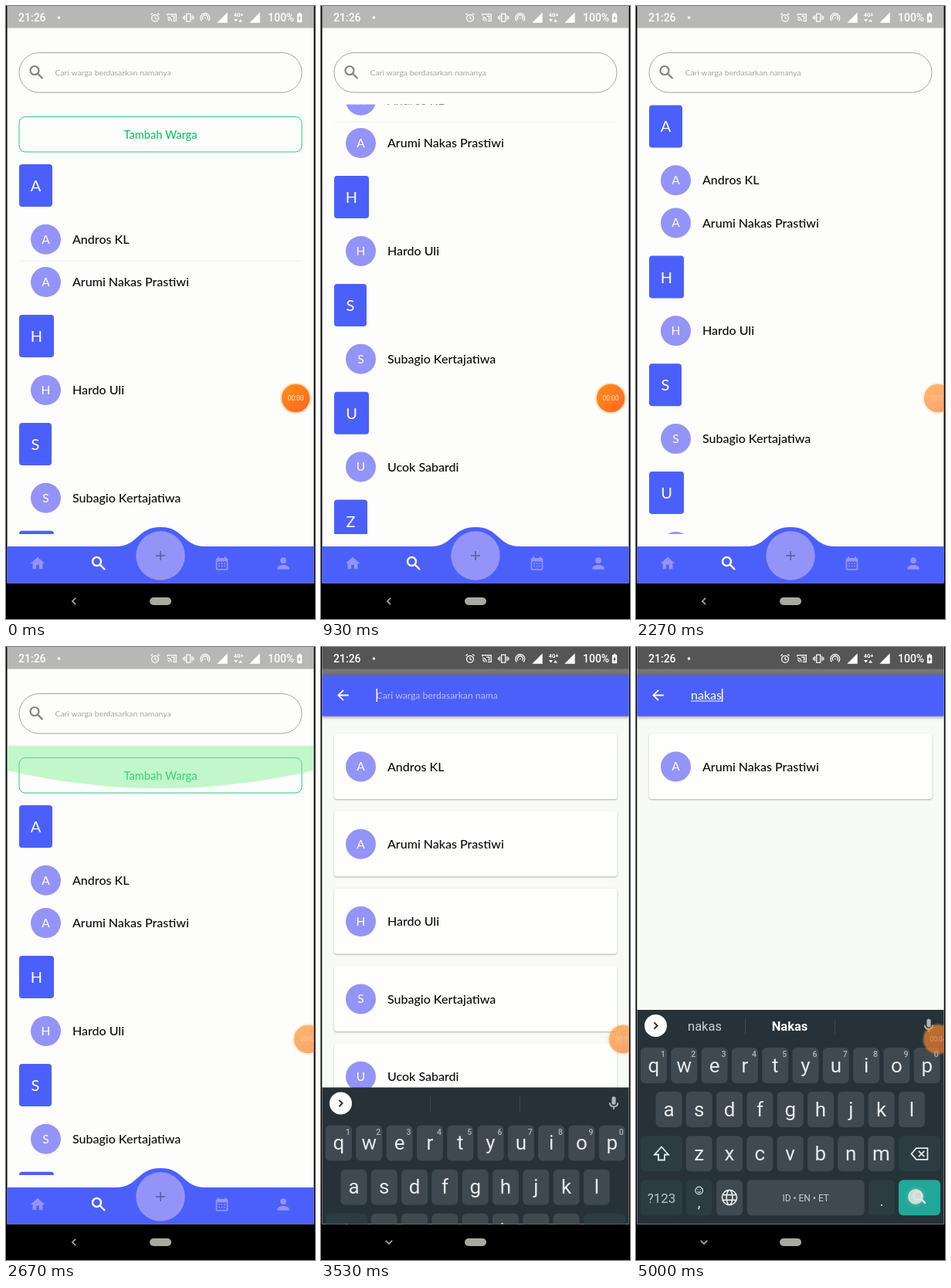
Recreate the animation shown at these times as an HTML page with a canvas. Size 400 px wide and 794 px high, loop 5070 ms.

```html
<!DOCTYPE html>
<html lang="id">
<head>
<meta charset="utf-8">
<style>
  html, body { margin: 0; width: 100%; height: 100%; overflow: hidden; background: #000; }
  canvas { display: block; }
</style>
</head>
<body>
<canvas id="stage" width="400" height="794"></canvas>
<script>
const c = document.getElementById('stage').getContext('2d');
const LOOP = 5070, STEP = LOOP / 76;
const BLUE = '#4b60fb', LILAC = '#9494f8', PAPER = '#fdfdfb', WHITE = '#fff';
const KEYBOARD = '#263238', KEY = '#3e4a50', SIDE_KEY = '#2c3c42', KEYTEXT = '#e6eaea', NAV = '#a9a9a2';
const ROUND = 'Lato, sans-serif', PLAIN = 'Roboto, sans-serif';
const NAMES = ['Andros KL', 'Arumi Nakas Prastiwi', 'Hardo Uli', 'Subagio Kertajatiwa', 'Ucok Sabardi', 'Zulham Wisnanto', 'q'];
const ROWS = ['qwertyuiop', 'asdfghjkl', 'zxcvbnm'];
const ROW_X = [23, 42.5, 81.7], PITCH = 39.3;

// Key presses: start time, key, touch position
const TAPS = [
  [4000, 'n', 278, 657], [4120, 'a', 43, 618], [4190, 'k', 323, 601],
  [4330, 'a', 43, 606], [4460, 's', 82, 602], [4920, '', 362, 712]
];
const COMMIT = 70, HOLD = 110;

const ICONS = {
  home: 'M10 20v-6h4v6h5v-8h3L12 3 2 12h3v8z',
  person: 'M12 12a4 4 0 1 0 0-8 4 4 0 0 0 0 8zm0 2c-2.67 0-8 1.34-8 4v2h16v-2c0-2.66-5.33-4-8-4z',
  calendar: 'M19 4h-1V2h-2v2H8V2H6v2H5a2 2 0 0 0-2 2v14a2 2 0 0 0 2 2h14a2 2 0 0 0 2-2V6a2 2 0 0 0-2-2zm0 16H5V9h14z' +
    'M7 11h2v2H7zM11 11h2v2h-2zM15 11h2v2h-2zM7 15h2v2H7zM11 15h2v2h-2zM15 15h2v2h-2z',
  back: 'M20 11H7.8l5.6-5.6L12 4l-8 8 8 8 1.4-1.4L7.8 13H20z',
  mic: 'M12 14a3 3 0 0 0 3-3V5a3 3 0 0 0-6 0v6a3 3 0 0 0 3 3zM17 11a5 5 0 0 1-10 0H5a7 7 0 0 0 6 6.9V21h2v-3.1A7 7 0 0 0 19 11z',
  battery: 'M15.7 4H14V2h-4v2H8.3C7.6 4 7 4.6 7 5.3v15.4c0 .7.6 1.3 1.3 1.3h7.4c.7 0 1.3-.6 1.3-1.3V5.3c0-.7-.6-1.3-1.3-1.3zM11 19v-5H9l4-7v5h2z',
  signal: 'M2 22h20V2z',
  // outlined
  search: 'M15 9.5a5.5 5.5 0 1 1-11 0a5.5 5.5 0 1 1 11 0zM13.6 13.6L20 20',
  left: 'M14.5 7l-5 5 5 5', right: 'M9.5 7l5 5-5 5', down: 'M7 9.5l5 5 5-5',
  shift: 'M12 3L3 13h5v7h8v-7h5z',
  erase: 'M8 5h14v14H8l-6-7zM11 8.5l7 7M18 8.5l-7 7',
  globe: 'M22 12a10 10 0 1 1-20 0a10 10 0 1 1 20 0zM16 12a4 10 0 1 1-8 0a4 10 0 1 1 8 0zM3.5 8.5h17M3.5 15.5h17',
  smile: 'M21 12a9 9 0 1 1-18 0a9 9 0 1 1 18 0zM8 14q4 5 8 0M8.5 8.5v2M15.5 8.5v2',
  alarm: 'M19 13a7 7 0 1 1-14 0a7 7 0 1 1 14 0zM12 9v4l3 2M3 6l4-3M21 6l-4-3',
  cast: 'M3 8V5h18v14h-7M3 11q8 0 8 8M3 15q4 0 4 4M11 9h6v6h-2',
  vibrate: 'M8 4h8v16H8zM4.5 7v10M19.5 7v10M1.5 9v6M22.5 9v6',
  hotspot: 'M5 19a9.5 9.5 0 1 1 14 0M8 16a5.5 5.5 0 1 1 8 0M12 11v3'
};

const clamp = v => Math.max(0, Math.min(1, v));
const part = (t, a, b) => clamp((t - a) / (b - a));
const ease = (t, a, b) => 1 - (1 - part(t, a, b)) ** 2;
const swell = (t, a, b) => Math.sin(Math.PI * part(t, a, b));

function rect(x, y, w, h, fill, r = 0, stroke) {
  c.beginPath();
  c.roundRect(x, y, w, h, r);
  if (fill) { c.fillStyle = fill; c.fill(); }
  if (stroke) { c.strokeStyle = stroke; c.lineWidth = 1; c.stroke(); }
}

function disc(x, y, r, fill) {
  c.beginPath();
  c.arc(x, y, r, 0, 7);
  c.fillStyle = fill;
  c.fill();
}

function text(s, x, y, size, fill, align = 'left', family = ROUND, weight = 400) {
  c.font = `${weight} ${size}px ${family}`;
  c.textAlign = align;
  c.textBaseline = 'alphabetic';
  c.fillStyle = fill;
  c.fillText(s, x, y + size * 0.35);
}

function icon(name, x, y, size, color, line) {
  const path = new Path2D(ICONS[name]);
  c.save();
  c.translate(x - size / 2, y - size / 2);
  c.scale(size / 24, size / 24);
  c.fillStyle = c.strokeStyle = color;
  c.lineWidth = line;
  if (line) c.stroke(path); else c.fill(path, 'evenodd');
  c.restore();
}

function clipped(x, y, w, h, draw) {
  c.save();
  c.beginPath();
  c.rect(x, y, w, h);
  c.clip();
  draw();
  c.restore();
}

function person(name, y) {
  disc(51.5, y, 19.5, LILAC);
  text(name[0], 51.5, y, 15.5, WHITE, 'center');
  text(name, 86, y, 16, '#0c0c0c', 'left', ROUND, 500);
}

function glow(edge, dir, amount, depth) {
  if (!amount) return;
  const d = depth * amount * dir;
  c.beginPath();
  c.moveTo(1, edge);
  c.lineTo(1, edge + d * 0.58);
  c.quadraticCurveTo(200, edge + d * 1.42, 399, edge + d * 0.58);
  c.lineTo(399, edge);
  c.fillStyle = `rgba(120,240,140,${0.46 * Math.sqrt(amount)})`;
  c.fill();
}

function drawList(t) {
  const scroll = 180 * ease(t, 270, 920) + 251 * ease(t, 1000, 1470) - 431 * ease(t, 1950, 2500);
  clipped(1, 127.5, 398, 556.5, () => {
    c.save();
    c.translate(0, -scroll);
    rect(17, 143.5, 366, 45.5, null, 8, '#25c97c');
    text('Tambah Warga', 200, 166.5, 14.5, '#12c06c', 'center', ROUND, 500);
    let y = 205, last = '';
    for (const name of NAMES) {
      if (name[0] !== last) {
        const w = { H: 45, U: 45, S: 42 }[name[0]] || 43;
        rect(17, y, w, 55, BLUE, 4);
        text(name[0], 17 + w / 2, y + 28, 20, WHITE, 'center');
        y += 97.3;
      } else {
        y += 55.3;
        if (t < 1900) rect(17, y - 27.5, 366, 1, '#f3f3e4');
      }
      person(name, y);
      last = name[0];
      const next = NAMES[NAMES.indexOf(name) + 1];
      if (next && next[0] !== last) y += 42.5;
    }
    c.restore();
    glow(127.5, 1, swell(t, 2480, 2980), 60);
    glow(684, -1, swell(t, 1470, 1900), 12.5);
  });
}

function drawHome(t) {
  rect(1, 0, 398, 748, PAPER);
  rect(17, 60.5, 366, 51.5, null, 25.7, '#a6a69c');
  icon('search', 39.5, 86, 24, '#858580', 2.2);
  text('Cari warga berdasarkan namanya', 63.5, 86, 10.4, '#a6a6a0');
  drawList(t);

  c.fillStyle = BLUE;
  c.fill(new Path2D('M1 748V700H142C172 700 169 675 200 675S228 700 258 700H399V748z'));
  disc(200, 712, 31.7, LILAC);
  rect(194, 711.2, 12, 1.6, '#5a5a9c');
  rect(199.2, 706, 1.6, 12, '#5a5a9c');
  icon('home', 41, 722, 22, LILAC);
  icon('search', 120, 722, 24, WHITE, 2.4);
  icon('calendar', 279.5, 722, 21, LILAC);
  icon('person', 359, 722, 23, LILAC);
}

function drawSearch(t, query) {
  const p = part(t, 3130, 3430);
  if (!p) return;
  c.save();
  c.globalAlpha = clamp(p * 1.6);
  c.translate(0, 198 * (1 - p) ** 2.2);
  rect(1, -20, 398, 770, '#f8faf6');

  const found = NAMES.filter(n => n.toLowerCase().includes(query));
  found.forEach((name, i) => {
    const y = 112 + i * 100.3;
    c.save();
    c.shadowColor = 'rgba(40,40,40,.35)';
    c.shadowBlur = 2;
    c.shadowOffsetY = 1;
    rect(17, y, 366.5, 85, '#fefefd', 4);
    c.restore();
    person(name, y + 43);
  });

  rect(1, -20, 398, 56, '#767676');
  c.save();
  c.shadowColor = 'rgba(40,40,40,.5)';
  c.shadowBlur = 4;
  c.shadowOffsetY = 1;
  rect(1, 36, 398, 53.5, BLUE);
  c.restore();
  icon('back', 28.5, 62.5, 22, WHITE);
  let caret = 71.5;
  if (query) {
    text(query, 71, 62.5, 16, WHITE);
    const w = c.measureText(query).width;
    rect(71, 69.5, w, 1, WHITE);
    caret = 71 + w;
  } else {
    text('Cari warga berdasarkan nama', 71.5, 63, 12.2, '#b9bdee');
  }
  rect(caret, 54, 1.5, 17, WHITE);
  c.restore();
}

function key(x, y, w, fill = KEY) {
  rect(x - w / 2, y, w, 46, fill, 6);
}

function keyPlace(k) {
  const row = ROWS.findIndex(r => r.includes(k));
  return [ROW_X[row] + ROWS[row].indexOf(k) * PITCH, 519 + row * 57.1];
}

function drawSuggestions(query) {
  disc(25.5, 490.5, 14.5, WHITE);
  icon('right', 25.5, 490.5, 20, KEYBOARD, 2.4);
  rect(141, 482, 1, 19, '#3c4a50');
  rect(257, 482, 1, 19, '#3c4a50');
  icon('mic', 379, 490.5, 21, '#aeb6b8');
  if (!query) return;
  const cap = query[0].toUpperCase() + query.slice(1);
  const words = query === 'na' ? ['na', 'ma', 'Na'] : [query, cap, ''];
  words.forEach((word, i) => {
    const bold = query.length === 5 && i === 1;
    text(word, [89, 199, 308][i], 491.5, 16.5, bold ? WHITE : '#cdd2d3', 'center', PLAIN, bold ? 700 : 400);
  });
}

function drawKeyboard(t, query) {
  const p = ease(t, 3440, 3680);
  if (!p) return;
  clipped(1, 400, 398, 348, () => {
    c.translate(0, 278 * (1 - p));
    rect(1, 470, 398, 280, KEYBOARD);
    drawSuggestions(query);
    [...ROWS.join('')].forEach((k, i) => {
      const [x, y] = keyPlace(k);
      key(x, y, 34);
      text(k, x, y + 22.5, 26, KEYTEXT, 'center', PLAIN);
      if (i < 10) text((i + 1) % 10, x + 12, y + 8.5, 10.5, '#aeb5b7', 'center', PLAIN, 500);
    });
    key(33, 633.2, 54, SIDE_KEY);
    icon('shift', 33, 656.5, 24, KEYTEXT, 1.8);
    key(367, 633.2, 54, SIDE_KEY);
    icon('erase', 367, 656.5, 25, KEYTEXT, 1.7);
    key(33, 690.3, 54, SIDE_KEY);
    text('?123', 33, 714, 17, '#bcc4c6', 'center', PLAIN);
    key(81.7, 690.3, 34, SIDE_KEY);
    icon('smile', 81.7, 704, 13, KEYTEXT, 2);
    text(',', 81.7, 719, 19, KEYTEXT, 'center', PLAIN);
    key(121, 690.3, 34);
    icon('globe', 121, 713, 23, KEYTEXT, 1.7);
    key(219.7, 690.3, 152);
    text('ID • EN • ET', 219.7, 714, 12, '#c6cccd', 'center', PLAIN);
    key(318, 690.3, 34, SIDE_KEY);
    text('.', 318, 717, 19, KEYTEXT, 'center', PLAIN);
    key(367, 690.3, 54, t >= TAPS[5][0] ? '#20a898' : '#6bb0a8');
    icon('search', 367, 713, 23, WHITE, 2.4);
  });
}

function drawTaps(t) {
  for (const [start, k, x, y] of TAPS) {
    const age = t - start;
    if (age < 0 || age > 270) continue;
    if (k && age < COMMIT) {
      const [kx, ky] = keyPlace(k);
      rect(kx - 20, ky - 68, 40, 114, '#303d43', 6);
      text(k, kx - 1.5, ky - 40, 27, WHITE, 'center', PLAIN);
      text('...', kx + 11, ky - 24, 12, WHITE, 'center', PLAIN);
    }
    if (age < HOLD || !k) {
      const ring = c.createRadialGradient(x, y, 8, x, y, 15);
      ring.addColorStop(0, 'rgba(150,180,185,.4)');
      ring.addColorStop(1, 'rgba(150,180,185,0)');
      disc(x, y, 15, ring);
      disc(x, y, 10, age < COMMIT || !k ? 'rgba(225,230,228,.85)' : 'rgba(195,200,198,.75)');
    }
  }
}

function drawStatus() {
  rect(1, 0, 398, 28.5, 'rgba(0,0,0,.28)');
  text('21:26', 16, 15, 14, WHITE, 'left', PLAIN, 500);
  disc(68.5, 15, 1.8, WHITE);
  ['alarm', 'cast', 'vibrate', 'hotspot'].forEach((name, i) =>
    icon(name, 193 + i * 21.6, 15, 15, WHITE, 2));
  icon('signal', 280, 15, 16, WHITE);
  text('4G+', 301, 11.5, 7, WHITE, 'center', PLAIN, 700);
  c.fillStyle = WHITE;
  c.fill(new Path2D('M295 17h5l-2.5 3.5zM301 20.5h5l-2.5-3.5z'));
  icon('signal', 322, 15, 16, WHITE);
  text('100%', 339, 15, 14, WHITE, 'left', PLAIN, 500);
  icon('battery', 380, 15, 15, WHITE);
}

function drawTimer(t) {
  const dock = part(t, 1520, 1720), x = 375 + 16 * dock, y = 508;
  const sec = Math.max(0, Math.floor((t - 300) / 1000));
  c.save();
  c.globalAlpha = 1 - 0.42 * clamp(dock * 2.5);
  disc(x, y, 20.3, 'rgba(255,185,110,.4)');
  const g = c.createLinearGradient(x - 14, y - 14, x + 14, y + 14);
  g.addColorStop(0, '#ff8c1c');
  g.addColorStop(1, '#ff6a20');
  disc(x, y, 18.3, g);
  c.globalAlpha = dock ? 0.4 : 0.9;
  text('00:0' + sec, x, y, 8.5, '#fff0e0', 'center', PLAIN);
  c.restore();
}

function drawFrame(t) {
  const query = TAPS.filter(tap => tap[1] && t >= tap[0] + COMMIT).map(tap => tap[1]).join('');
  rect(0, 0, 400, 794, '#000');
  clipped(1.5, 0, 397, 747.5, () => {
    drawHome(t);
    drawSearch(t, query);
    drawKeyboard(t, query);
    drawTaps(t);
    drawStatus();
    drawTimer(t);
  });
  icon(t < 3270 ? 'left' : 'down', 88, 771, 20, NAV, 2);
  rect(186, 766, 28, 10, NAV, 5);
}

const begin = performance.now();
function tick() {
  const t = (performance.now() - begin) % LOOP;
  drawFrame(Math.floor(t / STEP + 0.07) * STEP);
  requestAnimationFrame(tick);
}
tick();
</script>
</body>
</html>
```
